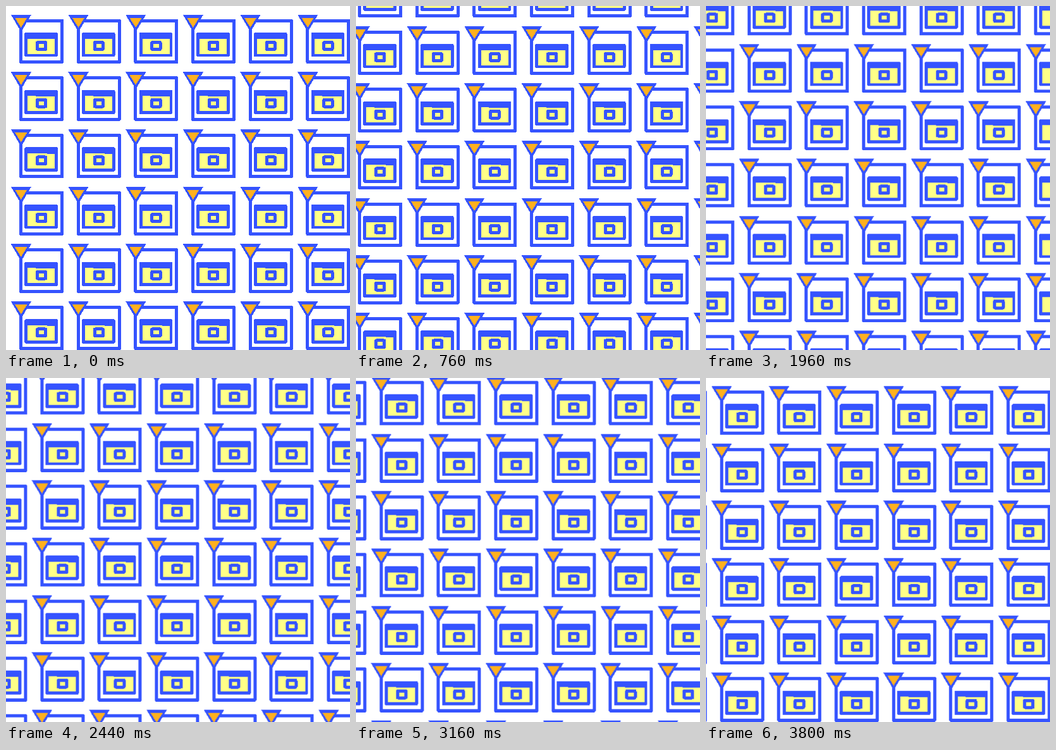
These frames come from a looping animation (544 by 544 pixels, 3840 ms). An HTML page:

```html
<!DOCTYPE html>
<html lang="en">
<head>
<meta charset="utf-8">
<title>Drifting tiles</title>
<style>
  html, body { margin: 0; width: 100%; height: 100%; overflow: hidden; background: #fff; }
  svg { display: block; width: 544px; height: 544px; shape-rendering: crispEdges; }
  #grid { animation: drift 3840ms steps(96) infinite; }
  @keyframes drift {
    to { transform: translate(-90.6667px, 90.6667px); }
  }
  .line { fill: none; stroke: #3553ff; stroke-width: 5; stroke-linejoin: round; }
  .blue { fill: #3553ff; }
  .yellow { fill: #ffff87; }
  .orange { fill: #ffb01f; }
</style>
</head>
<body>
<svg viewBox="0 0 544 544">
  <defs>
    <g id="tile">
      <path class="line" d="M23.6 23H88.6V88.5H23.6Z"/>
      <rect class="blue" x="29.3" y="42" width="52.6" height="38.4" rx="2.5"/>
      <path class="yellow" d="M34.2 51.6L77.2 52.4V75.6H34.2Z"/>
      <rect class="line" x="49.4" y="57.6" width="13.4" height="10.8" rx="1"/>
      <path class="blue" d="M7.8 13.8H40L23.9 41Z"/>
      <path class="orange" d="M14.2 18.8H33.4L23.8 34Z"/>
    </g>
  </defs>
  <g id="grid"></g>
</svg>
<script>
  const pitch = 544 / 6;
  const grid = document.getElementById('grid');

  // One spare row above and one spare column at the right cover the drift.
  for (let row = -1; row < 6; row++) {
    for (let col = 0; col < 7; col++) {
      const use = document.createElementNS(grid.namespaceURI, 'use');
      use.setAttribute('href', '#tile');
      use.setAttribute('x', col * pitch);
      use.setAttribute('y', row * pitch);
      grid.append(use);
    }
  }
</script>
</body>
</html>
```
